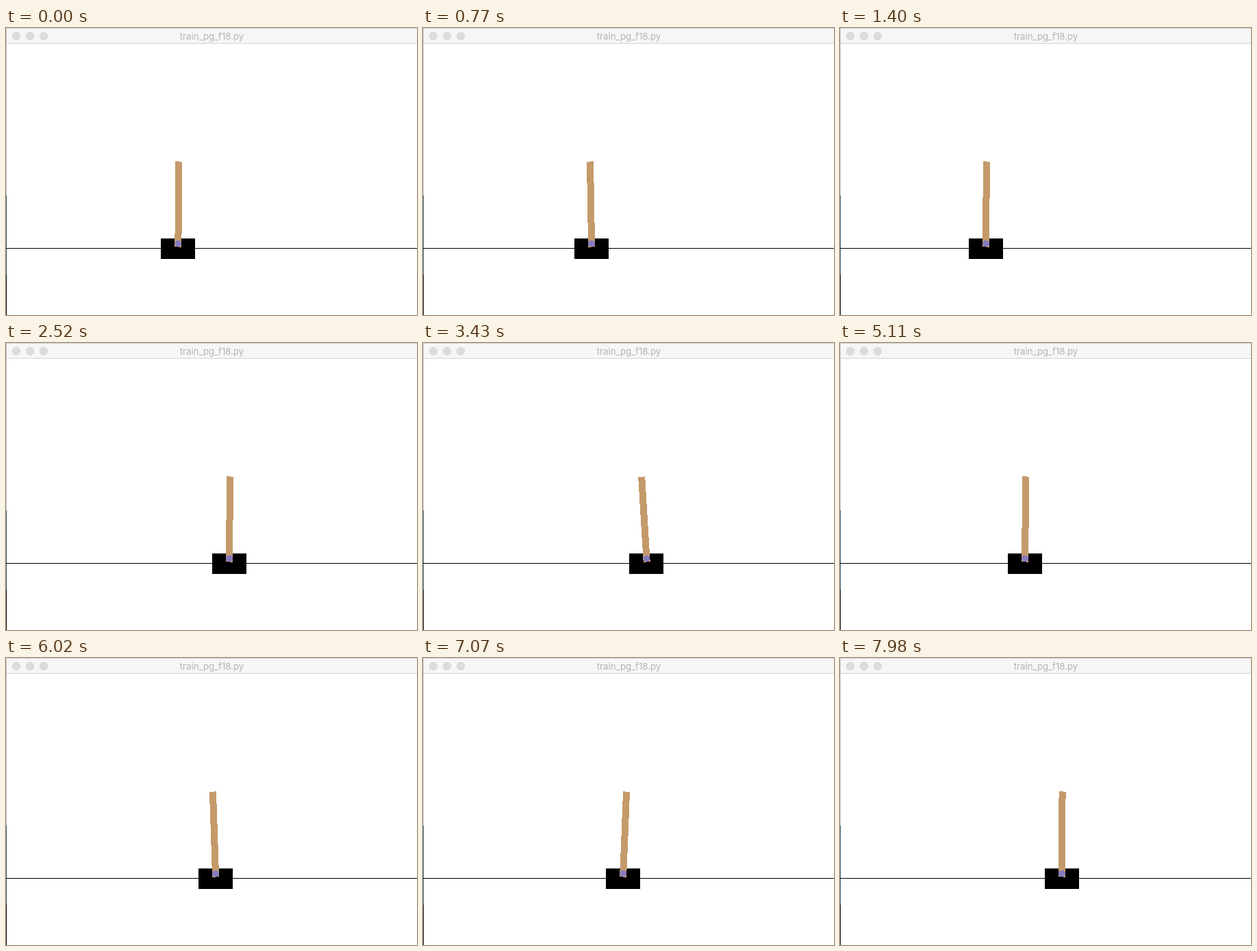
An HTML page for the animation above (8000 ms loop, 600 by 420 pixels).

```html
<!DOCTYPE html>
<html lang="en">
<head>
<meta charset="utf-8">
<title>Cart pole</title>
<style>
  html, body { margin: 0; width: 100%; height: 100%; overflow: hidden; background: #fff; }
  svg { display: block; width: 600px; height: 420px; }
  .crisp { shape-rendering: crispEdges; }
  text { font: 13.2px Inter, "Open Sans", sans-serif; fill: #b4b4b4; text-anchor: middle; }
</style>
</head>
<body>
<svg viewBox="0 0 600 420">
  <g class="crisp">
    <rect width="600" height="420" fill="#fff"/>
    <rect width="600" height="22" fill="#f6f6f6"/>
    <rect width="600" height="1" fill="#d2d2d2"/>
    <rect y="22" width="600" height="1" fill="#d3d3d3"/>
    <rect y="1" width="1" height="244" fill="#c4c4c4"/>
    <rect y="245" width="1" height="116" fill="#2f5468"/>
    <rect y="361" width="1" height="59"/>
    <rect y="322" width="600" height="1"/>
  </g>
  <g fill="#dcdcdc" stroke="#d2d2d2" stroke-width=".8">
    <circle cx="15" cy="12" r="5.7"/>
    <circle cx="35" cy="12" r="5.7"/>
    <circle cx="55" cy="12" r="5.7"/>
  </g>
  <text x="300.5" y="17">train_pg_f18.py</text>
  <g class="crisp">
    <rect id="cart" y="308" width="50" height="30"/>
    <rect id="pole" x="-5" y="-120" width="10" height="125" fill="#c49a6a"/>
    <circle id="axle" cy="315.5" r="5" fill="#867cc0"/>
  </g>
</svg>
<script>
const LOOP = 8000, STEP = 70;

// Key poses: [time in ms, cart centre, pole lean in degrees]
const poses = [
  [0, 251.4, .45], [350, 259, -2], [840, 243, -.8], [1400, 213.1, .36],
  [1750, 198, 4], [2100, 238, 5.5], [2520, 326.1, .42], [2940, 362, -4.5],
  [3430, 326.4, -3.46], [4200, 252.1, 5.1], [5040, 268, .6], [6020, 305.9, -1.9],
  [6720, 297, 1], [7020, 291, 2.4], [7560, 315, -.6], [7980, 324, .27]
];
const last = poses.length - 1;

const [cart, pole, axle] = ["cart", "pole", "axle"].map(id => document.getElementById(id));

function slope(i, col) {
  const a = poses[Math.max(i - 1, 0)], b = poses[Math.min(i + 1, last)];
  return (b[col] - a[col]) / (b[0] - a[0]);
}

// Cubic Hermite curve through the poses
function sample(t, col) {
  let i = 0;
  while (i < last - 1 && t >= poses[i + 1][0]) i++;
  const a = poses[i], b = poses[i + 1];
  const span = b[0] - a[0], u = (t - a[0]) / span, v = 1 - u;
  return a[col] * v * v * (1 + 2 * u) + b[col] * u * u * (3 - 2 * u)
    + span * u * v * (slope(i, col) * v - slope(i + 1, col) * u);
}

function draw(now) {
  const t = Math.floor(now % LOOP / STEP) * STEP;
  const x = sample(t, 1);
  cart.setAttribute("x", Math.round(x - 25));
  pole.setAttribute("transform", `translate(${x} 315.5) rotate(${sample(t, 2)})`);
  axle.setAttribute("cx", x);
}

const start = performance.now();
function tick() {
  draw(performance.now() - start);
  requestAnimationFrame(tick);
}
tick();
</script>
</body>
</html>
```
